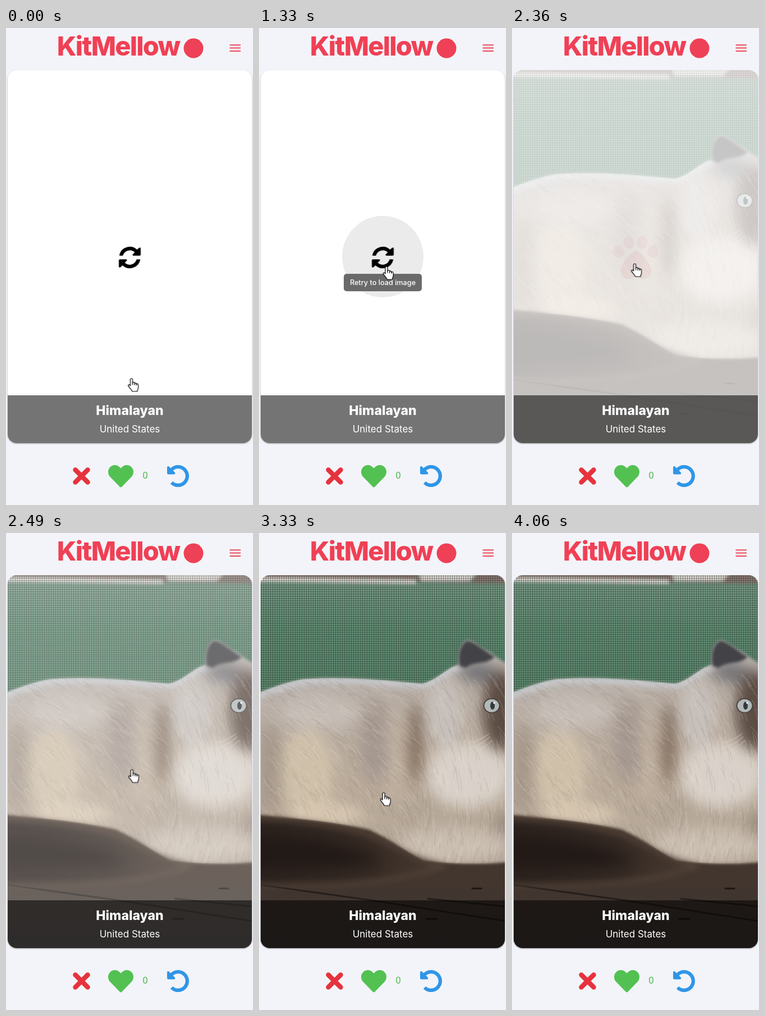
An HTML page for the animation above (4730 ms loop, 440 by 848 pixels).

```html
<!DOCTYPE html>
<html lang="en">
<head>
<meta charset="utf-8">
<title>Cat cards</title>
<style>
  html, body { margin: 0; width: 100%; height: 100%; overflow: hidden; background: #f3f4f9; }
  svg { display: block; width: 440px; height: 848px; }
  text { font-family: Inter, sans-serif; text-anchor: middle; }
  filter { color-interpolation-filters: sRGB; }
  #card { filter: drop-shadow(0 1px 1px #0005); }
  #tip { transform-box: fill-box; transform-origin: center; }
  #hover, #tip, #paw, #photo { opacity: 0; }
</style>
</head>
<body>
<svg viewBox="0 0 440 848">
  <defs>
    <clipPath id="cardClip"><rect x="3" y="75" width="435" height="663" rx="16"/></clipPath>
    <clipPath id="bodyClip"><use href="#body"/></clipPath>
    <pattern id="mesh" width="4" height="4" patternUnits="userSpaceOnUse">
      <path d="M0 .5H4M.5 0V4" stroke="#1a2a22" stroke-opacity=".42"/>
    </pattern>
    <linearGradient id="grass" x2="0" y2="1">
      <stop offset="0" stop-color="#7b9a88"/><stop offset=".4" stop-color="#628d74"/><stop offset="1" stop-color="#5b866d"/>
    </linearGradient>
    <linearGradient id="fur" x2=".15" y2="1">
      <stop offset="0" stop-color="#bcbcc0"/><stop offset=".35" stop-color="#b8ada3"/>
      <stop offset=".7" stop-color="#b9aa99"/><stop offset="1" stop-color="#b5a798"/>
    </linearGradient>
    <linearGradient id="wood" x2="0" y2="1">
      <stop offset="0" stop-color="#47382e"/><stop offset=".5" stop-color="#43362e"/><stop offset="1" stop-color="#3b3532"/>
    </linearGradient>
    <linearGradient id="tail" x2="1" y2="0">
      <stop offset="0" stop-color="#2a211d"/><stop offset=".6" stop-color="#352a24"/><stop offset="1" stop-color="#4a3b31"/>
    </linearGradient>
    <filter id="soft" x="-60%" y="-60%" width="220%" height="220%"><feGaussianBlur stdDeviation="12"/></filter>
    <filter id="fuzz"><feGaussianBlur stdDeviation="2.5"/></filter>
    <filter id="blend" x="-20%" y="-20%" width="140%" height="140%"><feGaussianBlur stdDeviation="6"/></filter>
    <path id="body" d="M-10 288C20 276 45 266 78 260C150 254 225 262 290 268C318 262 330 242 356 234C354 212 360 194 372 190C384 192 396 206 410 211C420 218 430 228 450 236V584C400 590 340 588 292 582C262 566 235 545 195 527C130 512 60 507 -10 500Z"/>
    <path id="arrow" d="M-18.6-4.2A19 19 0 0 1 13-13.9L16.2-17Q19.5-19.3 19.5-15.5V-5Q19.5-3.2 17.6-3.2H7Q3.6-3.4 5.7-6L8.9-9.3A12.8 12.8 0 0 0-12.2-3.2H-17.6Q-18.8-3.2-18.6-4.2Z"/>
  </defs>

  <rect width="440" height="848" fill="#f3f4f9"/>
  <text x="200" y="49" font-size="47" font-weight="800" letter-spacing="-1.8" fill="#f04055">KitMellow</text>
  <circle cx="334" cy="36" r="17.5" fill="#ee4056"/>
  <path d="M398.5 30.2H418M398.5 35.6H418M398.5 41H418" stroke="#ec4a5c" stroke-width="2"/>

  <rect id="card" x="3" y="75" width="435" height="663" rx="16" fill="#fff"/>
  <g clip-path="url(#cardClip)">
    <circle id="hover" cx="220.5" cy="406.5" r="72.5" fill="#ebebeb"/>
    <g id="retry" transform="translate(220.5 408)">
      <use href="#arrow"/><use href="#arrow" transform="rotate(180)"/>
    </g>
    <g id="paw" fill="#f8b0ba">
      <ellipse cx="190" cy="397.5" rx="9.5" ry="11.5" transform="rotate(-18 190 397.5)"/>
      <ellipse cx="208.5" cy="381.5" rx="9.5" ry="11.5" transform="rotate(-8 208.5 381.5)"/>
      <ellipse cx="232" cy="381.5" rx="9.5" ry="11.5" transform="rotate(8 232 381.5)"/>
      <ellipse cx="250.5" cy="397.5" rx="9.5" ry="11.5" transform="rotate(18 250.5 397.5)"/>
      <path d="M220.5 396C228 397 248 418 248 431C248 441 241 446 234 446C228 446 224 444 220.5 440C217 444 213 446 207 446C200 446 193.5 441 193.5 431C193.5 418 213 397 220.5 396Z" fill="#f38f9c"/>
    </g>
    <g id="photo">
      <rect y="75" width="440" height="230" fill="url(#grass)"/>
      <g filter="url(#fuzz)">
        <path d="M0 66H440V90L285 87L0 84Z" fill="#8a7670"/>
        <path d="M0 78L88 79L280 82V91L0 87ZM284 70H390L376 86H288Z" fill="#ddd6d2"/>
      </g>
      <rect y="75" width="440" height="225" fill="url(#mesh)"/>
      <rect y="480" width="440" height="260" fill="url(#wood)"/>
      <path d="M0 625L200 653L440 690M300 650L440 664" stroke="#251e1b" stroke-width="3" fill="none"/>
      <path d="M380 632h16M298 686h18" stroke="#1c1715" stroke-width="3" stroke-linecap="round"/>
      <use href="#body" fill="url(#fur)" filter="url(#fuzz)"/>
      <g clip-path="url(#bodyClip)">
        <g filter="url(#soft)">
          <ellipse cx="85" cy="425" rx="50" ry="75" fill="#cfc0aa"/>
          <ellipse cx="120" cy="500" rx="70" ry="18" fill="#d8c8b2"/>
          <ellipse cx="110" cy="320" rx="75" ry="30" fill="#c5bcb5"/>
          <ellipse cx="205" cy="370" rx="26" ry="75" fill="#a59890"/>
          <ellipse cx="242" cy="400" rx="14" ry="80" fill="#bfb0a0"/>
          <ellipse cx="279" cy="375" rx="9" ry="75" fill="#6f5949"/>
          <ellipse cx="20" cy="420" rx="20" ry="80" fill="#a5978a"/>
          <ellipse cx="330" cy="320" rx="34" ry="60" fill="#c6bfba"/>
          <ellipse cx="372" cy="430" rx="75" ry="58" fill="#d9d1c9"/>
          <ellipse cx="345" cy="555" rx="100" ry="30" fill="#cabeb1"/>
          <ellipse cx="290" cy="490" rx="30" ry="30" fill="#b3a596"/>
          <ellipse cx="432" cy="315" rx="34" ry="72" fill="#5c4c44"/>
          <ellipse cx="390" cy="248" rx="32" ry="18" fill="#727174"/>
          <ellipse cx="440" cy="520" rx="20" ry="22" fill="#998a7d"/>
        </g>
        <path d="M-10 290C20 278 45 268 78 262C150 256 225 264 290 270C318 264 330 244 356 236" fill="none" stroke="#cfd3da" stroke-width="10" filter="url(#blend)"/>
        <path id="light" fill="none" stroke="#f0e8de" stroke-opacity=".16" stroke-width="1.5"/>
        <path id="dark" fill="none" stroke="#5b4a3e" stroke-opacity=".1" stroke-width="1.5"/>
      </g>
      <path d="M357 236C353 214 360 194 372 191C386 194 400 208 420 220C404 236 386 226 368 240Z" fill="#434347" filter="url(#fuzz)"/>
      <path d="M-20 508C60 510 130 519 190 536C235 552 265 576 330 592C250 622 110 628 -20 624Z" fill="url(#tail)" stroke="#5d4c40" stroke-width="4" filter="url(#blend)"/>
      <path d="M-20 540C90 535 170 555 220 585C150 600 70 598 -20 596Z" fill="#221a17" filter="url(#soft)"/>
      <ellipse cx="414.5" cy="307" rx="15" ry="13.5" fill="#4b423e"/>
      <ellipse cx="414.5" cy="307" rx="13" ry="11.5" fill="#b1b9b9"/>
      <ellipse cx="416" cy="307" rx="4" ry="7" fill="#35393b"/>
      <circle cx="419" cy="302" r="1.8" fill="#fff"/>
      <path d="M412 362Q390 382 362 386M416 368Q398 386 372 394M410 357Q392 370 374 373" fill="none" stroke="#ddd2c8" stroke-opacity=".7"/>
    </g>
    <rect x="3" y="653" width="435" height="85" fill="#000" fill-opacity=".545"/>
  </g>
  <text x="220.5" y="688" font-size="23" font-weight="800" fill="#fff">Himalayan</text>
  <text x="220.5" y="719" font-size="17" fill="#fff">United States</text>

  <path d="M123.5 785.5L145.5 807.5M145.5 785.5L123.5 807.5" stroke="#e6333e" stroke-width="8.5" stroke-linecap="round"/>
  <path transform="translate(182 774.2) scale(.088)" fill="#52c152" d="M462 63C407 16 326 24 276 76L256 96L236 76C186 24 105 16 50 63C-13 116-16 212 40 270L233 470C246 483 266 483 279 470L472 270C528 212 525 116 462 63Z"/>
  <text x="248" y="801" font-size="17" fill="#55b955" style="font-family:Roboto,sans-serif">0</text>
  <path transform="translate(286.4 776.4) scale(.0786)" fill="#2f96e8" d="M256 8C189 8 129 34 85 77L49 41C34 26 8 37 8 58V192C8 205 19 216 32 216H166C187 216 198 190 183 175L141 133A168 168 0 1 1 145 382C141 378 133 378 129 383L89 423C84 428 85 435 90 440A248 248 0 1 0 256 8Z"/>

  <g id="tip">
    <rect x="151" y="437" width="139" height="31" rx="5" fill="#6a6a6a"/>
    <text x="220.5" y="457" font-size="12.7" font-weight="500" fill="#fff">Retry to load image</text>
  </g>
  <g id="hand" stroke="#000" stroke-width="1.2" stroke-linejoin="round" fill="#fff">
    <path d="M-2 2a2 2 0 0 1 4 0v6.5a1.8 1.8 0 0 1 3.6-.3v1a1.8 1.8 0 0 1 3.4.2v1a1.7 1.7 0 0 1 3.2.6v5c0 3-1.6 3.4-1.8 7h-9.400c-.6-3-5-6.500-6.600-9.600c-.8-2 1.500-3 3-1.400l.6 1z"/>
    <path d="M2 8.5v3M5.6 9v3M9 10v2.5" fill="none"/>
  </g>
</svg>
<script>
  const LOOP = 4730;
  const $ = id => document.getElementById(id);

  // Fur strokes: flat along the back, steeper towards the belly and chest.
  let seed = 7;
  const rand = () => (seed = seed * 16807 % 2147483647) / 2147483647;
  const fur = count => {
    let d = '';
    for (let i = 0; i < count; i++) {
      const x = rand() * 440, y = 245 + rand() * 340, len = 10 + rand() * 20;
      const angle = .5 + (y - 260) / 420 + (x > 280 ? .5 : 0) + (rand() - .5) * .4;
      const dx = len * Math.cos(angle), dy = len * Math.sin(angle);
      d += `M${x} ${y}q${dx * .6} ${dy * .35} ${dx} ${dy}`;
    }
    return d;
  };
  $('light').setAttribute('d', fur(600));
  $('dark').setAttribute('d', fur(500));

  // Each step is [ms, ...values]; the last one holds until the loop ends.
  const start = document.timeline.currentTime || 0;
  const play = (id, steps, toFrame, easing = 'linear') => {
    const all = [...steps, [LOOP, ...steps.at(-1).slice(1)]];
    const frames = all.map(([ms, ...v]) => ({ offset: ms / LOOP, easing, ...toFrame(...v) }));
    $(id).animate(frames, { duration: LOOP, iterations: Infinity }).startTime = start;
  };
  const fade = opacity => ({ opacity });
  const move = (x, y) => ({ transform: `translate(${x}px, ${y}px)` });
  const grow = (opacity, s) => ({ opacity, transform: `scale(${s})` });

  play('hand', [
    [0, 223.5, 623], [30, 223.5, 623], [270, 224, 490], [520, 225, 428], [580, 225, 428],
    [700, 227, 424], [2030, 227, 424], [2360, 218.5, 419], [2640, 231.5, 422.5], [3090, 230, 434],
    [3330, 222, 461.5], [3640, 290, 474], [3850, 452, 496]
  ], move, 'ease-in-out');
  play('hover', [[0, 0], [290, 0], [440, 1], [1550, 1], [1640, 0]], fade);
  play('tip', [[0, 0, .75], [390, 0, .75], [520, .95, .99], [600, 1, 1], [1550, 1, 1], [1680, 0, .75]], grow);
  play('retry', [[0, 1], [1550, 1], [1550, 0]], fade);
  play('paw', [[0, 0], [1560, 0], [1760, 1], [2150, 1], [2400, 0]], fade);
  play('photo', [[0, 0], [2270, 0], [2360, .3], [2550, 1]], fade);
</script>
</body>
</html>
```
